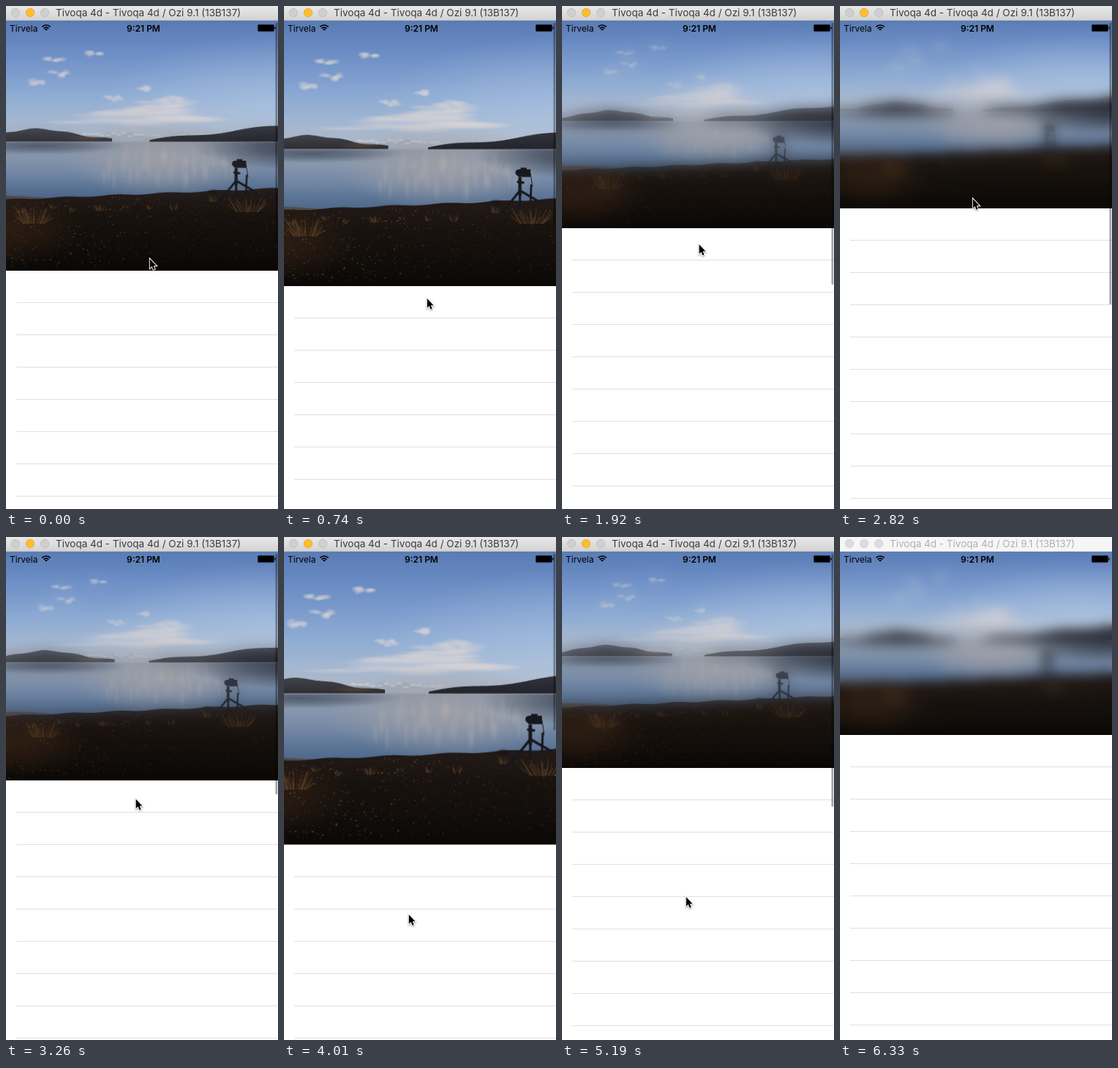
An HTML page with a canvas that plays this animation: 372 px wide and 686 px high, repeating every 6.35 s.

```html
<!DOCTYPE html>
<html lang="en">
<head>
<meta charset="utf-8">
<title>Stretchy blurred header</title>
<style>
  html, body { margin: 0; width: 100%; height: 100%; overflow: hidden; background: #fff; }
  canvas { display: block; }
</style>
</head>
<body>
<canvas id="stage" width="372" height="686"></canvas>
<script>
const LOOP = 6350, STEP = 148, BAR = 20, REST = 270, VIEW = 666;
const ctx = document.getElementById('stage').getContext('2d');

function makeCanvas(w, h) {
  const c = document.createElement('canvas');
  c.width = w;
  c.height = h;
  return c;
}

function vertical(g, top, bottom, ...colors) {
  const fill = g.createLinearGradient(0, top, 0, bottom);
  colors.forEach((c, i) => fill.addColorStop(i / (colors.length - 1), c));
  return fill;
}

function glow(g, x, y, rx, ry, rgb, alpha) {
  g.save();
  g.translate(x, y);
  g.scale(rx, ry);
  const fill = g.createRadialGradient(0, 0, 0, 0, 0, 1);
  fill.addColorStop(0, `rgba(${rgb},${alpha})`);
  fill.addColorStop(.5, `rgba(${rgb},${alpha * .6})`);
  fill.addColorStop(1, `rgba(${rgb},0)`);
  g.fillStyle = fill;
  g.fillRect(-1, -1, 2, 2);
  g.restore();
}

function line(g, width, x0, y0, x1, y1) {
  g.lineWidth = width;
  g.beginPath();
  g.moveTo(x0, y0);
  g.lineTo(x1, y1);
  g.stroke();
}

// Fills the area between a base line and the curve top(x).
function ridge(g, x0, x1, base, top, fill) {
  g.beginPath();
  g.moveTo(x0, base);
  for (let x = x0; x <= x1; x += 2) g.lineTo(x, top(x));
  g.lineTo(x1, base);
  g.fillStyle = fill;
  g.fill();
}

function seeded(seed) {
  return () => (seed = seed * 16807 % 2147483647) / 2147483647;
}

function drawLake() {
  const c = makeCanvas(600, 400), g = c.getContext('2d');
  const rnd = seeded(71), span = (a, b) => a + rnd() * (b - a);
  const left = -114, right = 486, width = 600;
  g.translate(-left, -BAR);

  function cloud(x, y, rx, ry) {
    for (let i = 0; i < 8; i++) {
      glow(g, x + span(-.8, .8) * rx, y + span(-.6, .6) * ry, rx * span(.3, .6), ry * span(.5, .9), '214,210,213', .55);
    }
  }

  function grass(x, y, spread, height) {
    for (let i = 0; i < spread * 1.2; i++) {
      const lean = span(-.5, .5);
      g.strokeStyle = `rgba(${span(105, 160)},${span(78, 105)},52,${span(.1, .5)})`;
      line(g, .9, x + lean * spread * .8, y, x + lean * spread * 1.5, y - height * span(.3, 1));
    }
  }

  // sky
  g.fillStyle = vertical(g, 20, 214, '#5a7bb3', '#688ac2', '#7a9acc', '#8dabd3', '#a3b7d2', '#b0b8c3');
  g.fillRect(left, 20, width, 194);
  glow(g, 420, 150, 300, 110, '200,217,240', .35);
  for (const [x, y] of [[45, 82], [16, 118], [52, 105], [107, 73], [183, 129], [140, 145]]) cloud(x, y, 16, 6);
  for (let i = 0; i < 6; i++) cloud(225 - i * 8, 147 + i * 7, 30 + i * 22, 7);

  // far range
  ridge(g, 70, 236, 214, x => 213 - 13 * Math.sin((x - 70) / 166 * Math.PI) - 2 * Math.sin(x / 5), '#9fabbc');
  for (let x = 95; x < 215; x += 9) glow(g, x, span(200, 205), 6, 2.5, '222,222,226', .6);

  // water
  g.fillStyle = vertical(g, 213, 310, '#828fa2', '#8797ad', '#7589a6', '#5c7596', '#4b6587');
  g.fillRect(left, 213, width, 100);
  glow(g, 220, 240, 160, 65, '164,162,166', .75);
  glow(g, 470, 224, 200, 36, '36,42,56', .85);
  glow(g, 20, 220, 140, 14, '62,70,86', .7);
  for (let i = 0; i < 40; i++) glow(g, span(110, 330), span(230, 276), span(3, 8), span(8, 26), '184,176,174', .22);

  // hills and waterline
  ridge(g, left, 138, 213.5, x => 210 - 17 * Math.exp(-(((x - 18) / 75) ** 2)) - Math.sin(x / 9),
    vertical(g, 192, 213, '#41434c', '#302e32'));
  glow(g, 95, 208, 34, 5, '100,74,56', .5);
  ridge(g, 198, right, 214, x => 211 - (x - 198) * .11 - 2 * Math.sin((x - 198) / 22),
    vertical(g, 180, 214, '#393a43', '#24252b'));
  g.fillStyle = 'rgba(160,170,186,.6)';
  g.fillRect(left, 213.5, width, 1.2);

  // shore
  const shore = x => 305 - x * .042 + Math.sin(x / 13);
  ridge(g, left, 60, 330, x => 300 + ((x + 60) / 50) ** 2, '#544a46');
  ridge(g, left, right, 421, shore, vertical(g, 290, 420, '#231b18', '#19130f', '#120e0b', '#0b0807'));
  glow(g, -40, 355, 130, 60, '70,44,26', .5);
  for (let i = 0; i < 1500; i++) {
    const x = span(left, right), depth = rnd();
    g.fillStyle = `rgba(${span(110, 165)},${span(85, 118)},66,${rnd() ** 2 * (x < 200 ? .7 : .35)})`;
    g.fillRect(x, shore(x) + 4 + depth * 105, span(.8, 2.6), span(.8, 1.8));
  }
  grass(13, 345, 44, 28);
  grass(355, 326, 44, 24);
  for (let x = -80; x < 320; x += span(30, 70)) grass(x, shore(x) + span(14, 30), span(8, 18), span(6, 12));
  glow(g, 300, 294, 11, 5, '24,19,18', 1);

  // camera on tripod
  g.strokeStyle = g.fillStyle = '#17181d';
  g.lineCap = 'round';
  line(g, 5, 337, 258, 337, 282);
  for (const dx of [-30, 0, 32]) line(g, 3.5, 337, 276, 337 + dx, 304 - dx * .3);
  line(g, 3, 354, 268, 353, 294);
  line(g, 1, 353, 250, 356, 270);
  line(g, 3.5, 334, 263, 342, 264);
  g.fillRect(334, 244, 19, 11.5);
  g.fillRect(338, 241.5, 9, 4);
  g.beginPath();
  g.arc(335, 249, 4.8, 0, 7);
  g.fill();
  return c;
}

function blurred(image) {
  const c = makeCanvas(600, 400), g = c.getContext('2d');
  g.drawImage(image, 0, 0);
  g.filter = 'blur(13px)';
  g.drawImage(image, 0, 0);
  g.drawImage(image, 0, 0);
  return c;
}

const sharp = drawLake(), soft = blurred(sharp);

function smoothstep(u) {
  u = Math.min(1, Math.max(0, u));
  return u * u * (3 - 2 * u);
}

// Finger travel of each pull, and when the finger lets go.
const PULLS = [
  { release: 1680, travel: t => 275 - 83 * Math.exp(-t / 735) },
  { release: 4942, travel: t => 370 * smoothstep((t - 2650) / 1560) }
];

// Rubber band while held, critically damped spring afterwards.
function overscroll(t) {
  const { release, travel } = PULLS[t < 2500 ? 0 : 1];
  const rubber = VIEW * (1 - 1 / (travel(Math.min(t, release)) * .55 / VIEW + 1));
  const decay = 10.5 * Math.max(0, t - release) / 1000;
  const offset = rubber * (1 + decay) * Math.exp(-decay);
  return offset < .5 ? 0 : offset;
}

const POINTER = [
  [0, 196, 344], [740, 195, 398], [1680, 190, 418], [2368, 181, 154],
  [2664, 181, 166], [2812, 181, 262], [3996, 170, 514], [5180, 169, 490], [5740, -20, 430]
];

function pointerAt(t) {
  const i = POINTER.findIndex(p => p[0] > t), a = POINTER[i - 1], b = POINTER[i];
  const k = (t - a[0]) / (b[0] - a[0]);
  return [1, 2].map(j => a[j] + (b[j] - a[j]) * k);
}

function drawHeader(bottom) {
  const h = bottom - BAR, w = h * 1.5;
  ctx.save();
  ctx.beginPath();
  ctx.rect(0, BAR, 372, h);
  ctx.clip();
  ctx.drawImage(sharp, 186 - w / 2, BAR, w, h);
  ctx.globalAlpha = Math.min(1, Math.max(0, (370 - bottom) / 100));
  ctx.drawImage(soft, 186 - w / 2, BAR, w, h);
  ctx.restore();
}

function label(text, x, y, font, color, align = 'left') {
  ctx.font = font + ' Inter, sans-serif';
  ctx.textAlign = align;
  ctx.fillStyle = color;
  ctx.fillText(text, x, y);
}

function drawStatus() {
  label('Tirvela', 5, 35, '12px', '#000');
  label('9:21 PM', 188, 35, '600 12px', '#000', 'center');
  ctx.strokeStyle = '#000';
  ctx.lineWidth = 1.7;
  for (const r of [2, 4.8, 8]) {
    ctx.beginPath();
    ctx.arc(55, 34, r, -Math.PI * .75, -Math.PI * .25);
    ctx.stroke();
  }
  ctx.lineWidth = .7;
  ctx.beginPath();
  ctx.roundRect(344.4, 25.4, 22.2, 9.2, 1.5);
  ctx.stroke();
  ctx.fillRect(345, 26, 21, 8);
  ctx.fillRect(367.4, 28.5, 1.3, 3);
}

function drawTitleBar(active) {
  ctx.fillStyle = active ? vertical(ctx, 0, BAR, '#e8e8e8', '#d2d2d2') : '#f6f6f6';
  ctx.fillRect(0, 0, 372, BAR);
  ctx.fillStyle = active ? '#bdbdbd' : '#dedede';
  ctx.fillRect(0, BAR - 1, 372, 1);
  ctx.lineWidth = .8;
  for (const x of [13, 33, 53]) {
    const lit = active && x === 33;
    ctx.beginPath();
    ctx.arc(x, 9, 5.7, 0, 7);
    ctx.fillStyle = lit ? '#fdbd2f' : active ? '#cfcfcf' : '#dcdcdc';
    ctx.strokeStyle = lit ? '#e2a52c' : active ? '#bcbcbc' : '#d1d1d1';
    ctx.fill();
    ctx.stroke();
  }
  label('Tivoqa 4d - Tivoqa 4d / Ozi 9.1 (13B137)', 68, 14, '13.5px', active ? '#3c3c3c' : '#b0b0b0');
}

const arrow = new Path2D('M0 0V15L3.5 11.8L6 17.3L8.6 16.2L6.2 10.8H11Z');

function drawPointer(x, y) {
  ctx.save();
  ctx.translate(x + .8, y + 1);
  ctx.scale(.8, .85);
  ctx.shadowColor = 'rgba(0,0,0,.4)';
  ctx.shadowBlur = 2;
  ctx.shadowOffsetY = 1;
  ctx.strokeStyle = '#fff';
  ctx.lineWidth = 2.4;
  ctx.stroke(arrow);
  ctx.shadowColor = 'transparent';
  ctx.fillStyle = '#000';
  ctx.fill(arrow);
  ctx.restore();
}

function draw(now) {
  const time = now % LOOP;
  const t = Math.floor((time + 5) / STEP) * STEP;
  const bottom = REST + Math.round(overscroll(t) * 2) / 2;

  ctx.fillStyle = '#fff';
  ctx.fillRect(0, 0, 372, 686);
  drawHeader(bottom);
  ctx.fillStyle = '#e0e0e2';
  for (let y = Math.floor(bottom + 43.5); y < 686; y += 44) ctx.fillRect(14, y, 358, 1);
  drawStatus();
  if (t < 5700) {
    ctx.fillStyle = 'rgba(0,0,0,.36)';
    ctx.beginPath();
    ctx.roundRect(368.5, 23, 2.7, 660 - bottom, 1.3);
    ctx.fill();
    drawPointer(...pointerAt(t));
  }
  drawTitleBar(time < 6330);
}

function tick() {
  draw(performance.now());
  requestAnimationFrame(tick);
}
tick();
</script>
</body>
</html>
```
